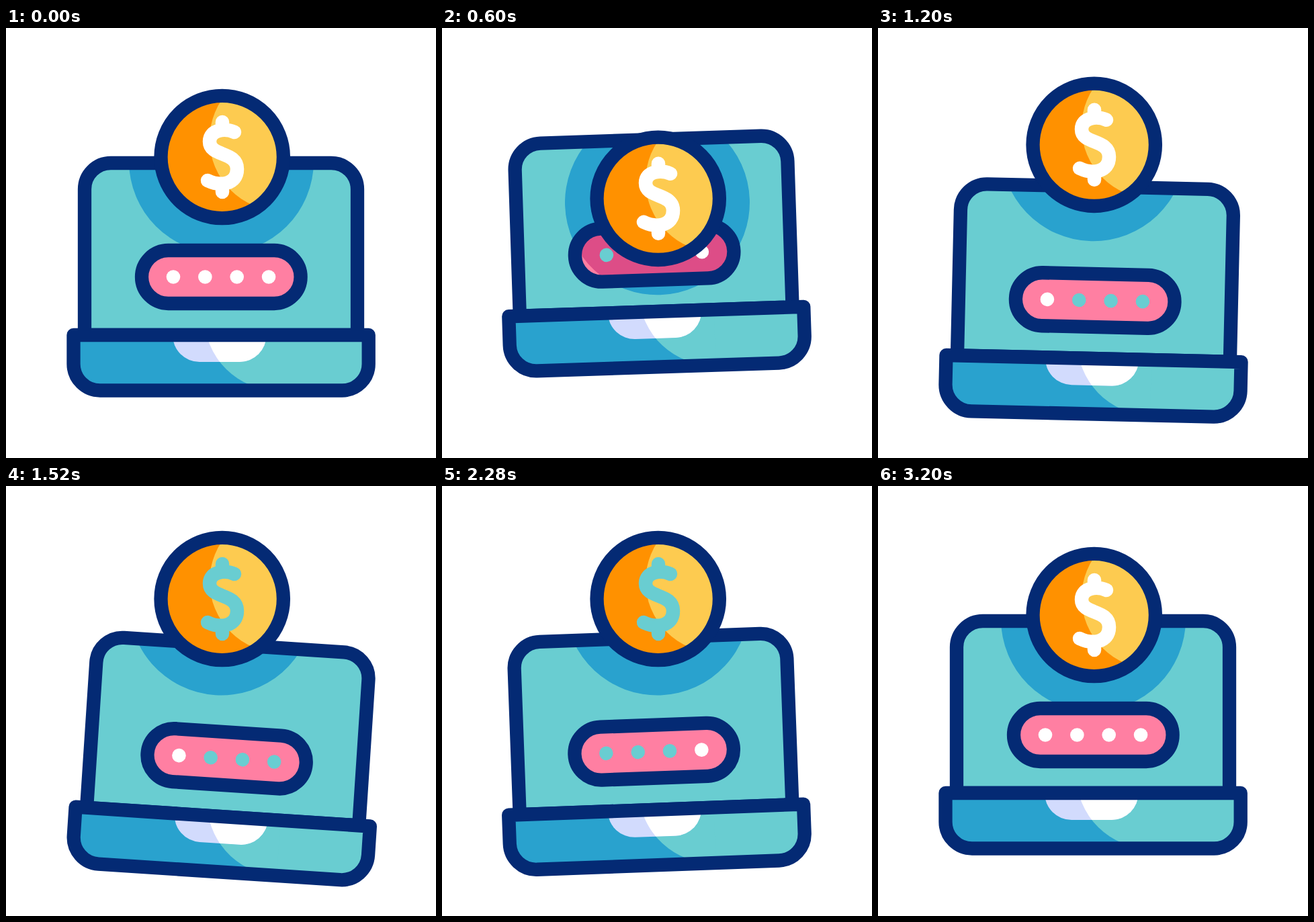
Animation of 640x640 px, one loop 3.6 s. Source, as an HTML page:

```html
<!DOCTYPE html>
<html lang="en">
<head>
<meta charset="utf-8">
<title>Online payment</title>
<style>
  html, body { margin: 0; width: 100%; height: 100%; overflow: hidden; background: #fff; }
  svg { display: block; width: 100%; height: 100%; }
  .line { fill: none; stroke: #042a74; stroke-width: 20.3; stroke-linejoin: round; }
  .teal { fill: #69cdd1; }
  .blue { fill: #29a2ce; }
</style>
</head>
<body>
<svg viewBox="0 0 640 640">
  <defs>
    <path id="screen" d="M117 457V240a39 39 0 0 1 39-39H484a39 39 0 0 1 39 39V457Z"/>
    <path id="base" d="M100.5 457H539.7V500a39.5 39.5 0 0 1-39.5 39.5H140a39.5 39.5 0 0 1-39.5-39.5Z"/>
    <path id="tab" d="M248 457a40 40 0 0 0 40 40H347.5a40 40 0 0 0 40-40Z"/>
    <rect id="pill" x="202" y="331" width="236.6" height="79" rx="39.5"/>
    <circle id="disc" cx="321.7" r="91.2"/>
    <clipPath id="inScreen"><use href="#screen"/></clipPath>
    <clipPath id="inBase"><use href="#base"/></clipPath>
    <clipPath id="inTab"><use href="#tab"/></clipPath>
    <clipPath id="inPill"><use href="#pill"/></clipPath>
    <clipPath id="inDisc"><use href="#disc"/></clipPath>
  </defs>

  <g id="laptop">
    <use href="#screen" class="teal"/>
    <g clip-path="url(#inScreen)"><circle class="shadow blue" r="137.5"/></g>
    <use href="#screen" class="line"/>

    <use href="#pill" fill="#ff7fa2"/>
    <g clip-path="url(#inPill)"><circle class="shadow" r="137.5" fill="#dd4d87"/></g>
    <use href="#pill" class="line"/>
    <g id="dots"></g>

    <use href="#base" class="blue"/>
    <g clip-path="url(#inBase)"><circle class="teal" cx="406" cy="429" r="111"/>
      <rect class="teal" x="406" y="457" width="140" height="90"/></g>
    <use href="#tab" fill="#d2dbfd"/>
    <g clip-path="url(#inTab)"><circle cx="406" cy="429" r="111" fill="#fff"/></g>
    <use href="#base" class="line"/>
  </g>

  <g id="coin">
    <use href="#disc" fill="#ff9100"/>
    <g clip-path="url(#inDisc)"><circle cx="409" cy="-26" r="106" fill="#fdcb50"/></g>
    <use href="#disc" class="line"/>
    <path id="dollar" transform="translate(0 -192)" fill="none" stroke-width="20.5"
      stroke-linecap="round" stroke-linejoin="round"
      d="M340 155C326 149 303 151 303 169C303 192 344 183 344 210C344 233 319 236 300 227M322 140V151M322 233V244"/>
  </g>
</svg>
<script>
  const LOOP = 3600, STEP = 20;
  const TEAL = '#69cdd1', WHITE = '#fff';
  const PIVOT = { x: 320, y: 497 };
  const tracks = {
    coin: [[200, 192], [560, 254.5], [1320, 168], [2710, 168], [3200, 192]],
    lift: [[200, 0], [600, -35], [1080, 35], [2100, 35], [2600, 0]],
    tilt: [[385, 0], [900, -5], [1410, 5], [1910, -5], [2580, 0]]
  };
  const byId = id => document.getElementById(id);
  const laptop = byId('laptop'), coin = byId('coin'), dollar = byId('dollar');
  const shadows = document.querySelectorAll('.shadow');

  const dots = [0, 1, 2, 3].map(i => {
    const dot = document.createElementNS('http://www.w3.org/2000/svg', 'circle');
    dot.setAttribute('cx', 249 + 47.35 * i);
    dot.setAttribute('cy', 370.5);
    dot.setAttribute('r', 10.3);
    return byId('dots').appendChild(dot);
  });

  // Eased value between the two keys around t, held outside them.
  function valueAt(keys, t) {
    const next = keys.findIndex(key => key[0] > t);
    if (next === 0) return keys[0][1];
    if (next < 0) return keys[keys.length - 1][1];
    const [t0, v0] = keys[next - 1], [t1, v1] = keys[next];
    const s = (t - t0) / (t1 - t0);
    return v0 + (v1 - v0) * s * s * (3 - 2 * s);
  }

  function litDot(t) {
    return t >= 770 && t < 1740 ? 0 : 3;
  }

  function draw(t) {
    const coinY = valueAt(tracks.coin, t);
    const lift = valueAt(tracks.lift, t);
    const tilt = valueAt(tracks.tilt, t);

    laptop.setAttribute('transform', `translate(0 ${lift}) rotate(${tilt} ${PIVOT.x} ${PIVOT.y})`);
    coin.setAttribute('transform', `translate(0 ${coinY})`);

    // The shadow follows the coin, so undo the laptop's own movement.
    const a = -tilt * Math.PI / 180;
    const dx = 320.5 - PIVOT.x, dy = coinY + 6 - PIVOT.y - lift;
    for (const shadow of shadows) {
      shadow.setAttribute('cx', PIVOT.x + dx * Math.cos(a) - dy * Math.sin(a));
      shadow.setAttribute('cy', PIVOT.y + dx * Math.sin(a) + dy * Math.cos(a));
    }

    const allWhite = t < 200 || t >= 2710;
    dots.forEach((dot, i) => dot.setAttribute('fill', allWhite || i === litDot(t) ? WHITE : TEAL));
    dollar.setAttribute('stroke', t >= 1300 && t < 2710 ? TEAL : WHITE);
  }

  function tick() {
    draw(Math.floor(performance.now() % LOOP / STEP) * STEP);
    requestAnimationFrame(tick);
  }
  tick();
</script>
</body>
</html>
```
